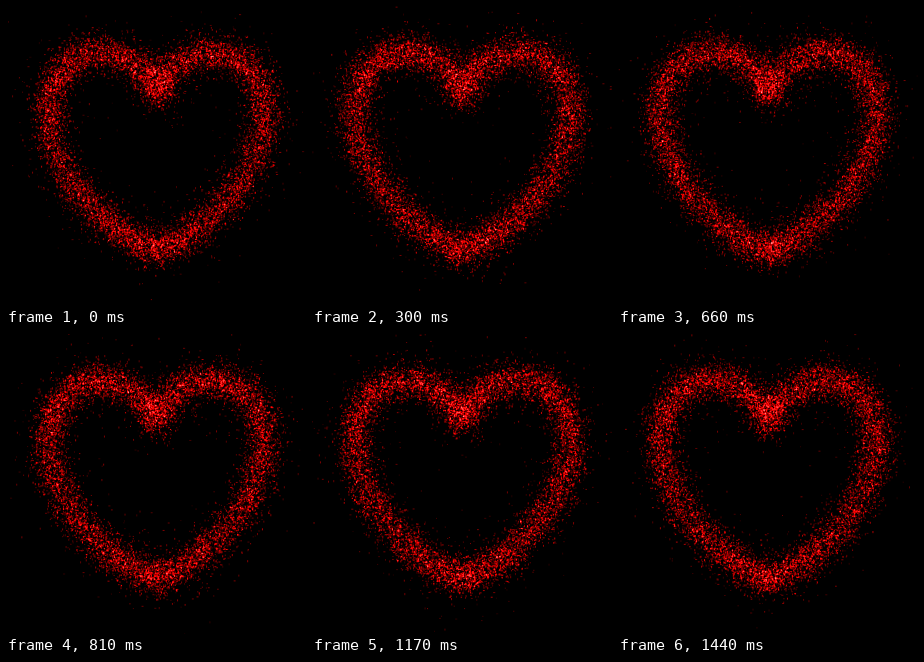
An HTML page with a canvas that plays this animation: 300x300 px, repeating every 1470 ms.

```html
<!DOCTYPE html>
<html lang="en">
<head>
<meta charset="utf-8">
<title>Particle heart</title>
<style>
  html, body { margin: 0; width: 100%; height: 100%; overflow: hidden; background: #000; }
  canvas { display: block; }
</style>
</head>
<body>
<canvas id="stage" width="300" height="300"></canvas>
<script>
const SIZE = 300, STEP = 30, LOOP = 1470;
const COUNT = 11000, TOP_SPEED = 160;
const { sin, cos, PI } = Math;
const ctx = document.getElementById('stage').getContext('2d');
const image = ctx.createImageData(SIZE, SIZE);
const pixels = image.data;
const light = new Float32Array(SIZE * SIZE);

function makeRandom(seed) {
  return () => {
    seed = (seed + 0x6D2B79F5) | 0;
    let n = Math.imul(seed ^ (seed >>> 15), 1 | seed);
    n = (n + Math.imul(n ^ (n >>> 7), 61 | n)) ^ n;
    return ((n ^ (n >>> 14)) >>> 0) / 4294967296;
  };
}

function heart(t) {
  return [
    150 + 108 * sin(t) ** 3,
    136 - 101 * cos(t) + 30 * cos(2 * t) + 23 * cos(3 * t)
  ];
}

function speed(t) {
  return Math.hypot(
    324 * sin(t) ** 2 * cos(t),
    101 * sin(t) - 60 * sin(2 * t) - 69 * sin(3 * t)
  );
}

function addLight(x, y, amount) {
  if (x >= 0 && y >= 0 && x < SIZE && y < SIZE) light[y * SIZE + x] += amount;
}

// A one-pixel dot at a fractional position, shared between its four neighbours.
function dot(x, y, amount) {
  const left = Math.floor(x), top = Math.floor(y);
  const fx = x - left, fy = y - top;
  addLight(left, top, amount * (1 - fx) * (1 - fy));
  addLight(left + 1, top, amount * fx * (1 - fy));
  addLight(left, top + 1, amount * (1 - fx) * fy);
  addLight(left + 1, top + 1, amount * fx * fy);
}

function draw(step) {
  const random = makeRandom(step * 7919 + 17);
  const gauss = () => Math.sqrt(-2 * Math.log(1 - random())) * cos(2 * PI * random());
  // Even out the spacing along the curve, leaving the two cusps slightly denser.
  const pick = () => {
    let t;
    do t = random() * 2 * PI; while (random() > (speed(t) + 12) / TOP_SPEED);
    return heart(t);
  };

  light.fill(0);
  for (let i = 0; i < COUNT; i++) {
    const [px, py] = pick();
    const stray = random() < 0.1;
    const spread = stray ? 20 : 9.2;
    const x = px + gauss() * spread, y = py + gauss() * spread;
    const red = (50 + 150 * random()) * (stray ? 0.7 : 1);
    dot(x, y, red);
    const shape = random();
    if (shape < 0.35) dot(x, y + 1, red * 0.8);
    else if (shape < 0.55) dot(x + 1, y, red * 0.8);
  }

  // A few small hot spots
  for (let i = 0; i < 3; i++) {
    const [px, py] = pick();
    const x = px + gauss() * 7, y = py + gauss() * 7;
    for (let d = -2; d <= 2; d++) {
      const amount = 110 / (1 + Math.abs(d));
      dot(x + d, y, amount);
      dot(x, y + d, amount);
    }
  }

  // Light beyond full red turns slightly pale.
  light.forEach((value, i) => {
    const pale = Math.max(0, value - 255) * 0.4;
    pixels[4 * i] = value;
    pixels[4 * i + 1] = pixels[4 * i + 2] = pale;
    pixels[4 * i + 3] = 255;
  });
  ctx.putImageData(image, 0, 0);
}

const start = performance.now();
let shown = -1;

function tick() {
  const step = Math.floor(((performance.now() - start) % LOOP) / STEP);
  if (step !== shown) {
    draw(step);
    shown = step;
  }
  requestAnimationFrame(tick);
}
tick();
</script>
</body>
</html>
```
